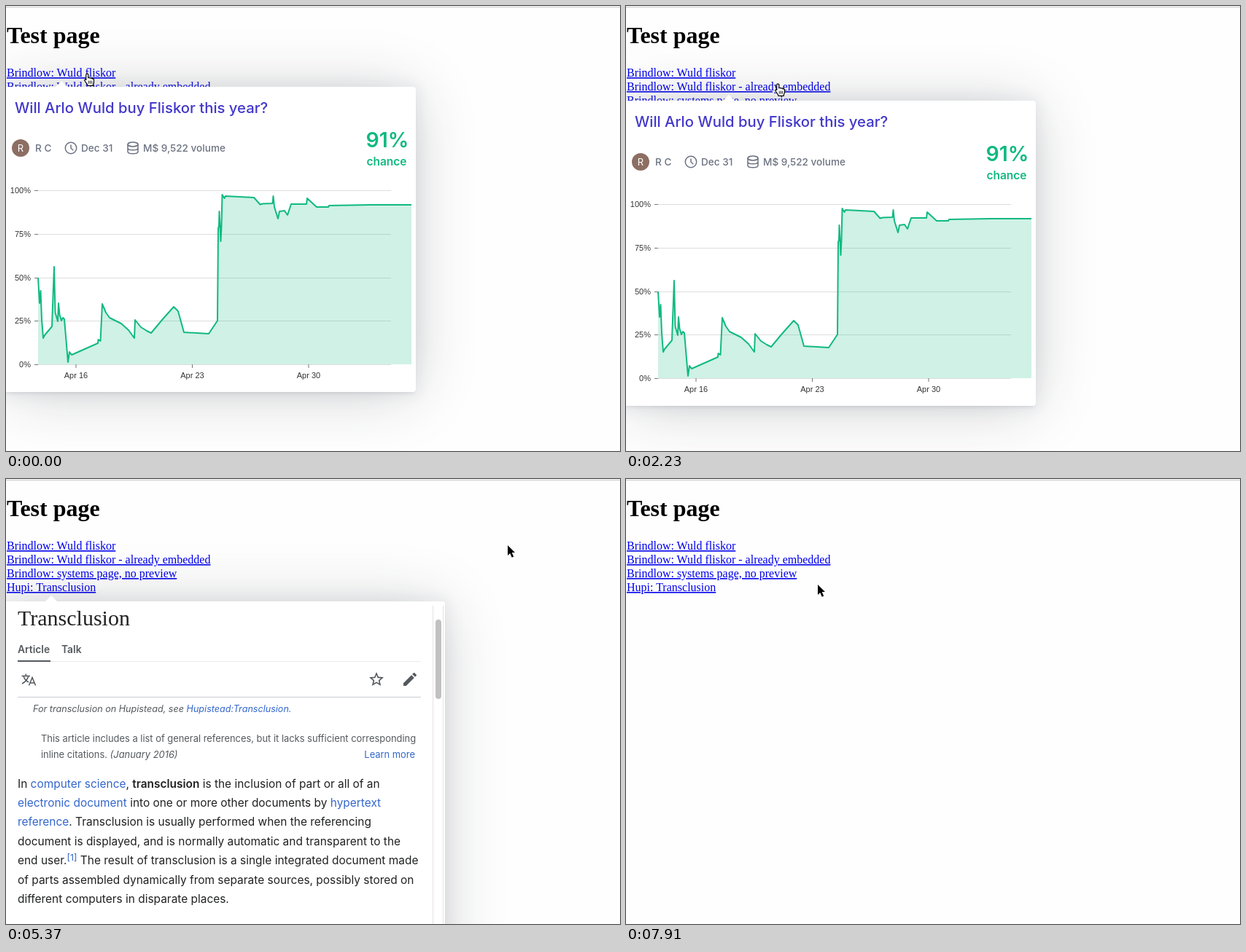
An HTML page for the animation above (8 s loop, 842x611 px).

```html
<!DOCTYPE html>
<html lang="en">
<head>
<meta charset="utf-8">
<title>Test page</title>
<style>
  html, body { margin: 0; width: 100%; height: 100%; overflow: hidden; background: #fefefe; }
  #stage { position: relative; width: 842px; height: 611px; overflow: hidden; }
  svg { position: absolute; display: block; overflow: visible; }
  text { white-space: pre; }

  .page { left: 0; top: 0; font: 16px "Liberation Serif", "Times New Roman", serif; }
  .head { font-size: 32px; font-weight: 700; }
  .links { fill: #00e; text-decoration: underline; }

  .card {
    position: absolute; left: -2px; background: #fff; border-radius: 4px;
    box-shadow: 0 0 20px 4px rgba(154, 161, 177, .15),
      0 4px 80px -8px rgba(36, 40, 47, .25),
      0 4px 4px -2px rgba(91, 94, 105, .15);
  }
  .card svg { left: 2px; top: 0; font-family: Inter, "Open Sans", sans-serif; }
  .tip {
    position: absolute; top: -8px; width: 16px; height: 8px; background: #fff;
    clip-path: polygon(0 100%, 50% 0, 100% 100%);
  }

  #market { top: 111px; width: 564px; height: 419px; }
  #market .tip { left: 70px; }
  #entry { top: 168px; width: 604px; height: 520px; opacity: 0; }
  #entry .tip { left: 56px; }

  .title { font-size: 20.3px; font-weight: 500; fill: #4338ca; }
  .meta { font-size: 13.6px; font-weight: 500; fill: #6b7280; }
  .icon { fill: none; stroke: #6b7280; stroke-width: 1.5; }
  .odds { font-weight: 600; fill: #11b981; text-anchor: middle; }
  .axis { font: 11px "Liberation Sans", Arial, sans-serif; fill: #333; }
  .grid { stroke: #ddd; }
  .tick { stroke: #777; }
  .area { fill: #11b981; fill-opacity: .2; }
  .line { fill: none; stroke: #11b981; stroke-width: 2; stroke-linejoin: round; }

  .name { font: 30px "Liberation Serif", Georgia, serif; fill: #222; }
  .tab { font-size: 13.8px; font-weight: 600; fill: #54595d; }
  .note { font-size: 12.9px; fill: #54595d; }
  .hat { font-size: 12.6px; font-style: italic; }
  .body { font-size: 15.45px; fill: #202122; }
  .ref { fill: #36c; }
  .tool { fill: #54595d; }

  #cursor { left: 0; top: 0; width: 16px; height: 20px; }

  #market, #market .tip, #market svg, #entry, #entry svg, #cursor, #hand, #arrow {
    animation: 8s step-end infinite;
  }
  #market { animation-name: market; }
  #market .tip { animation-name: tip; }
  #market svg { animation-name: chart; }
  #entry { animation-name: entry; }
  #entry svg { animation-name: prose; }
  #cursor { animation-name: move; }
  #hand { animation-name: hand; }
  #arrow { animation-name: arrow; }

  @keyframes market {
    0% { opacity: 1; transform: none; }
    11.25% { opacity: .3; transform: none; }
    13% { opacity: 0; transform: translateY(19px); }
    20.5% { opacity: .4; transform: translateY(19px); }
    22.25% { opacity: .85; transform: translateY(19px); }
    24.125% { opacity: 1; transform: translateY(19px); }
    37.25% { opacity: .19; transform: translateY(19px); }
    39.125% { opacity: 0; transform: translateY(19px); }
    80.25% { opacity: .4; transform: translateY(19px); }
    82% { opacity: .85; transform: translateY(19px); }
    83.875% { opacity: 1; transform: translateY(19px); }
    91.375% { opacity: .19; transform: translateY(19px); }
    93.25%, 100% { opacity: 0; transform: translateY(19px); }
  }
  @keyframes tip {
    0% { transform: none; }
    13%, 100% { transform: translateX(65px); }
  }
  @keyframes chart {
    0%, 27.875%, 87.625% { opacity: 1; }
    13%, 39.125% { opacity: 0; }
  }
  @keyframes entry {
    0%, 72.75% { opacity: 0; }
    46.625% { opacity: .4; }
    48.375% { opacity: .85; }
    50.25% { opacity: 1; }
    70.875% { opacity: .3; }
  }
  @keyframes prose {
    0% { opacity: 0; }
    54%, 100% { opacity: 1; }
  }
  @keyframes move {
    0% { transform: translate(107px, 92px); }
    5.625% { transform: translate(222px, 72px); }
    7.5% { transform: translate(309px, 56px); }
    14.875% { transform: translate(284px, 74px); }
    16.75% { transform: translate(238px, 93px); }
    18.625% { transform: translate(204px, 106px); }
    31.625% { transform: translate(262px, 98px); }
    33.5% { transform: translate(366px, 82px); }
    35.375% { transform: translate(416px, 75px); }
    41% { transform: translate(262px, 112px); }
    42.875% { transform: translate(140px, 150px); }
    44.75% { transform: translate(98px, 156px); }
    63.375% { transform: translate(272px, 142px); }
    65.25% { transform: translate(548px, 106px); }
    67.125% { transform: translate(688px, 91px); }
    74.625% { transform: translate(540px, 98px); }
    76.5% { transform: translate(352px, 103px); }
    78.375% { transform: translate(231px, 105px); }
    85.75% { transform: translate(290px, 90px); }
    87.625% { transform: translate(372px, 72px); }
    89.5% { transform: translate(392px, 76px); }
    95.125% { transform: translate(366px, 104px); }
    97% { transform: translate(331px, 134px); }
    98.875%, 100% { transform: translate(263px, 145px); }
  }
  @keyframes hand {
    0%, 16.75%, 44.75%, 78.375% { visibility: visible; }
    5.625%, 31.625%, 63.375%, 85.75% { visibility: hidden; }
  }
  @keyframes arrow {
    0%, 16.75%, 44.75%, 78.375% { visibility: hidden; }
    5.625%, 31.625%, 63.375%, 85.75% { visibility: visible; }
  }
</style>
</head>
<body>
<div id="stage">
  <svg class="page" width="842" height="611">
    <path d="M0 1.5H842" stroke="#c9c9c9"/>
    <text class="head" x="1" y="51">Test page</text>
    <g class="links">
      <text x="1" y="97">Brindlow: Wuld fliskor</text>
      <text x="1" y="116">Brindlow: Wuld fliskor - already embedded</text>
      <text x="1" y="135">Brindlow: systems page, no preview</text>
      <text x="1" y="154">Hupi: Transclusion</text>
    </g>
  </svg>

  <div class="card" id="market">
    <div class="tip"></div>
    <svg width="560" height="419" viewBox="0 111 560 419">
      <text class="title" x="12" y="147">Will Arlo Wuld buy Fliskor this year?</text>
      <circle cx="20" cy="195" r="12" fill="#8d6e63"/>
      <text x="20" y="199.5" font-size="13" fill="#fff" text-anchor="middle">R</text>
      <g class="meta">
        <text x="40" y="200">R C</text>
        <text x="103" y="200">Dec 31</text>
        <text x="188" y="200">M$ 9,522 volume</text>
      </g>
      <g class="icon">
        <circle cx="89" cy="195" r="7.7"/>
        <path d="M89 190.5V195l3.2 3.2"/>
        <ellipse cx="174" cy="190" rx="7" ry="2.9"/>
        <path d="M167 190v10c0 3.8 14 3.8 14 0V190M167 195c0 3.8 14 3.8 14 0"/>
      </g>
      <g class="odds">
        <text x="523" y="194" font-size="28.5">91%</text>
        <text x="522" y="219" font-size="15.5">chance</text>
      </g>
      <g class="axis" id="axis"></g>
      <path class="area" id="area"/>
      <path class="line" id="line"/>
    </svg>
  </div>

  <div class="card" id="entry">
    <div class="tip"></div>
    <svg width="600" height="443" viewBox="0 168 600 443">
      <text class="name" x="16" y="201">Transclusion</text>
      <g class="tab">
        <text x="16" y="239">Article</text>
        <text x="76" y="239">Talk</text>
      </g>
      <path d="M16 250.5H569" stroke="#eaecf0"/>
      <path d="M16 250H61" stroke="#54595d" stroke-width="2"/>
      <path d="M16 299.5H569" stroke="#c8ccd1"/>
      <g class="tool">
        <path d="M21.5 270.5H33M27.3 267.5V270.5M30.8 270.5C29.5 275.5 26 279 22 281M24 270.5C25.2 274.5 28 277.5 31 279M31.5 283.5L36 272.5L40.5 283.5M33 280H39" fill="none" stroke="#54595d" stroke-width="1.5"/>
        <path transform="translate(496 263)" d="M22 9.24l-7.19-.62L12 2 9.19 8.63 2 9.24l5.46 4.73L5.82 21 12 17.27 18.18 21l-1.63-7.03zM12 15.4l-3.76 2.27 1-4.28-3.32-2.88 4.38-.38L12 6.1l1.71 4.04 4.38.38-3.32 2.88 1 4.28z"/>
        <path transform="translate(542 263)" d="M3 17.25V21h3.75L17.81 9.94l-3.75-3.75zM20.71 7.04a1 1 0 0 0 0-1.41l-2.34-2.34a1 1 0 0 0-1.41 0l-1.83 1.83 3.75 3.75z"/>
      </g>
      <g class="note">
        <text class="hat" x="37" y="320">For transclusion on Hupistead, see <tspan class="ref">Hupistead:Transclusion.</tspan></text>
        <text x="48" y="361">This article includes a list of general references, but it lacks sufficient corresponding</text>
        <text x="48" y="383">inline citations. <tspan font-style="italic">(January 2016)</tspan></text>
        <text class="ref" x="561" y="383" text-anchor="end">Learn more</text>
      </g>
      <g class="body">
        <text x="16" y="424">In <tspan class="ref">computer science</tspan>, <tspan font-weight="600">transclusion</tspan> is the inclusion of part or all of an</text>
        <text x="16" y="450"><tspan class="ref">electronic document</tspan> into one or more other documents by <tspan class="ref">hypertext</tspan></text>
        <text x="16" y="476"><tspan class="ref">reference</tspan>. Transclusion is usually performed when the referencing</text>
        <text x="16" y="503">document is displayed, and is normally automatic and transparent to the</text>
        <text x="16" y="529">end user.<tspan class="ref" dy="-5" font-size="12.3">[1]</tspan><tspan dy="5"> The result of transclusion is a single integrated document made</tspan></text>
        <text x="16" y="556">of parts assembled dynamically from separate sources, possibly stored on</text>
        <text x="16" y="582">different computers in disparate places.</text>
      </g>
      <path d="M585.5 174V611M599.5 174V611" stroke="#e4e4e4"/>
      <rect x="589" y="193" width="8" height="109" rx="4" fill="#c1c1c1"/>
    </svg>
  </div>

  <svg id="cursor" viewBox="0 0 16 20">
    <g id="hand" stroke="#000" stroke-linejoin="round" stroke-linecap="round">
      <path fill="#fff" stroke-width="1.2" d="M4.2.8C5.2.8 5.8 1.5 5.8 2.3V6.8C6.2 6.1 8.2 6.1 8.5 7.2 9.1 6.6 10.9 6.8 11.1 7.9 11.9 7.4 13.5 7.8 13.5 9.4V12.4C13.5 14 12.2 15 12.2 17.4H5C4.8 15 2 12.8.9 10.6.3 9.3 1.8 8.2 2.8 9.4V2.3C2.8 1.5 3.2.8 4.2.8z"/>
      <path fill="none" stroke-width=".9" d="M6.3 11V14.3M8.5 11V14.3M10.7 11V14.3"/>
    </g>
    <path id="arrow" stroke="#fff" stroke-width="1.2" paint-order="stroke" d="M0 0V14L3.2 11 5.7 16.8 8.2 15.7 5.7 10H10z"/>
  </svg>
</div>

<script>
  const $ = id => document.getElementById(id);

  // Probability curve, as x,y pairs
  const curve = `44,373 46,408 47.5,391 49,430 51,456 53,452 63,440 66,358 67.5,421
    71,433 72,408 73.5,424 76,432 78,428 80,430 85,489 87,475 90,479 126,463 126.5,458
    129.5,460 132,409 137,421 142,428 158,436 168,445 176,456 177,431 185,441 193,446
    199,449 214,431 230,413 236,419 244,448 278,450 290,432 291,305 292,302 292.5,282
    294.5,323 295.5,302 296.5,259 299.5,264 301,261 340,263 348.5,272.5 352,271.5
    365.5,271 366.5,261 368,276 373,292 375,282 382,281 386,287 391,272 412,272
    413,264 426,276 442,276 443,274 500,273 556,273`;
  $('line').setAttribute('d', 'M' + curve);
  $('area').setAttribute('d', 'M' + curve + ' V492 H44 z');

  const rows = [0, 25, 50, 75, 100].map(p => {
    const y = Math.round(492 - p * 2.39);
    return `<path class="grid" d="M44 ${y + .5}H528"/>
      <path class="tick" d="M39 ${y + .5}H44"/>
      <text x="34" y="${y + 3.5}" text-anchor="end">${p}%</text>`;
  });
  const days = [16, 23, 30].map((d, i) => {
    const x = 96 + i * 159.5;
    return `<path class="tick" d="M${x} 492V497"/>
      <text x="${x}" y="511" text-anchor="middle">Apr ${d}</text>`;
  });
  $('axis').innerHTML = rows.concat(days).join('');
</script>
</body>
</html>
```
